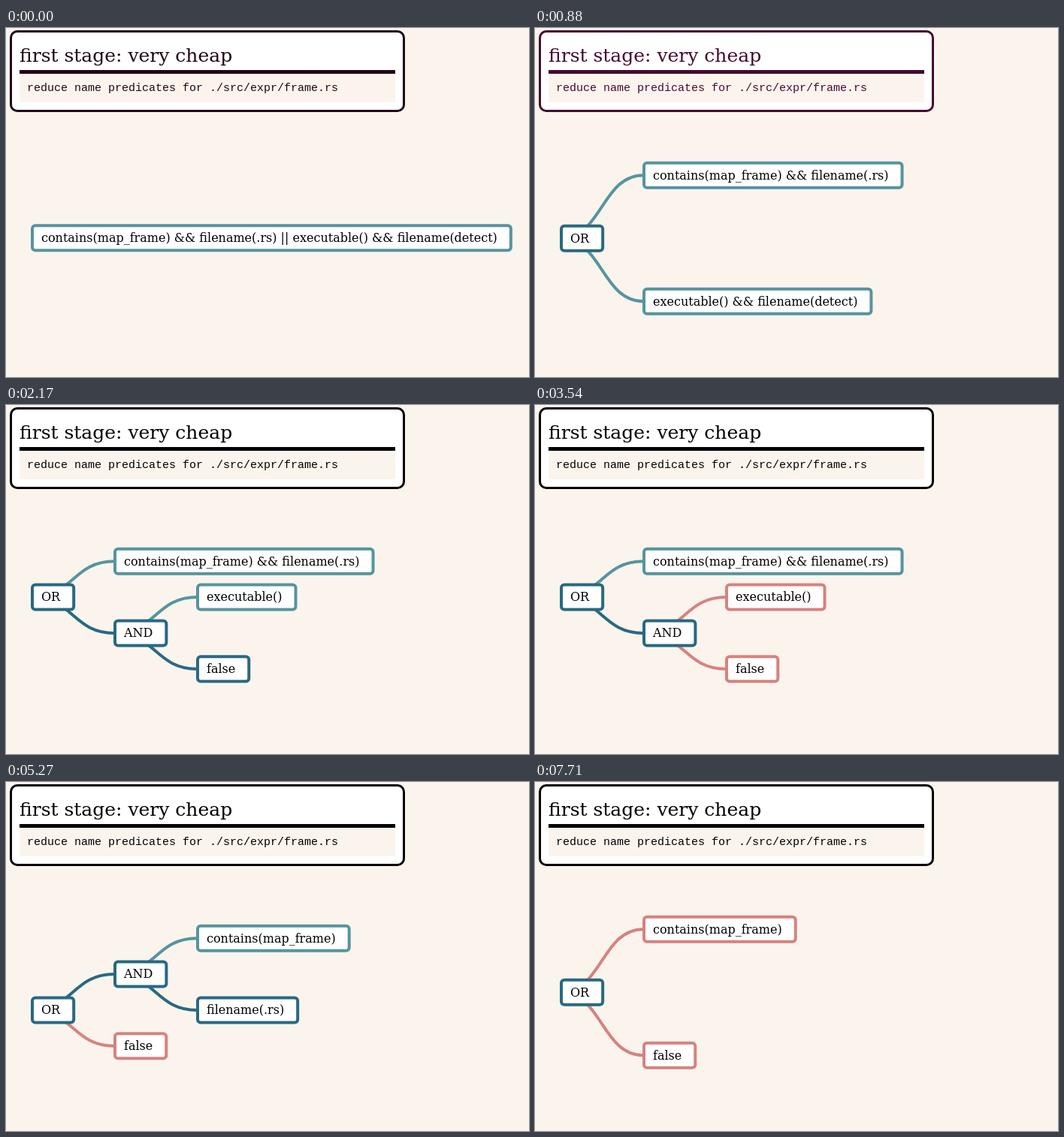
Animation of 696x465 px, one loop 8 s. Source, as an HTML page:

```html
<!DOCTYPE html>
<html lang="en">
<head>
<meta charset="utf-8">
<title>Predicate reduction</title>
<style>
  html, body { margin: 0; width: 100%; height: 100%; overflow: hidden; background: #faf4ed; }
  svg { display: block; width: 696px; height: 465px; }
  text { white-space: pre; }
  .title { font: 25px "DejaVu Serif", serif; }
  .code { font: 15px "Liberation Mono", monospace; }
  #tree { font: 16px "DejaVu Serif", serif; }
  #tree rect { fill: #fff; stroke-width: 4; }
  #tree path { fill: none; stroke-width: 4; }
</style>
</head>
<body>
<svg viewBox="0 0 696 465">
  <g id="head" fill="currentColor">
    <rect x="6.5" y="4.5" width="523" height="106" rx="8.5" fill="#fff" stroke="currentColor" stroke-width="3"/>
    <rect x="18" y="61" width="500" height="38" fill="#faf4ed"/>
    <rect x="18" y="56" width="500" height="5"/>
    <text class="title" x="18" y="45">first stage: very cheap</text>
    <text class="code" x="28" y="84">reduce name predicates for ./src/expr/frame.rs</text>
  </g>
  <g id="tree"><g id="edges"></g><g id="nodes"></g></g>
</svg>
<script>
const LOOP = 8000, MOVE = 240, INDENT = 110;
const IDLE = [86, 148, 159], ACTIVE = [40, 105, 131], DONE = [215, 130, 126];
const FLASH = [199, 21, 133], BLACK = [0, 0, 0];

const node = (text, color, ...kids) => ({ text, color, kids });
const or = (...kids) => node('OR', ACTIVE, ...kids);
const and = (...kids) => node('AND', ACTIVE, ...kids);
const map = c => node('contains(map_frame)', c);
const exec = c => node('executable()', c);
const detect = c => node('filename(detect)', c);
const rs = c => node('filename(.rs)', c);
const no = node('false', DONE), yes = node('true', DONE);
const left = node('contains(map_frame) && filename(.rs)', IDLE);
const right = node('executable() && filename(detect)', IDLE);
const whole = node(left.text + ' || ' + right.text, IDLE);

const steps = [
  [-1000, whole],
  [388, or(left, right)],
  [938, or(left, and(exec(IDLE), detect(IDLE)))],
  [1518, or(left, and(exec(IDLE), detect(ACTIVE)))],
  [2133, or(left, and(exec(IDLE), no))],
  [2728, or(left, and(exec(ACTIVE), no))],
  [3298, or(left, and(exec(DONE), no))],
  [3868, or(left, no)],
  [4493, or(and(map(IDLE), rs(IDLE)), no)],
  [5008, or(and(map(IDLE), rs(ACTIVE)), no)],
  [5643, or(and(map(IDLE), yes), no)],
  [6158, or(and(map(ACTIVE), yes), no)],
  [6808, or(and(map(DONE), yes), no)],
  [7433, or(map(DONE), no)]
].map(([start, root]) => ({ start, nodes: place(root) }));

// Flat map from path to placed node, parents before children
function place(root) {
  const out = new Map();
  const deep = root.kids.findIndex(k => k.kids.length);
  const gap = deep < 0 ? 84 : 47.8;
  const top = !root.kids.length ? 279.7 : deep < 0 ? 280.2 : deep ? 256.1 : 303.9;
  const walk = (n, path, x, y) => {
    out.set(path, { text: n.text, color: n.color, x, y });
    n.kids.forEach((k, i) => walk(k, path + i, x + INDENT, y + (i ? gap : -gap)));
  };
  walk(root, 'r', 33, top);
  return out;
}

const mix = (a, b, p) => a + (b - a) * p;
const blend = (a, b, p) => `rgb(${a.map((v, i) => Math.round(mix(v, b[i], p)))})`;
const clamp = v => Math.min(1, Math.max(0, v));
const ease = p => p < .5 ? 4 * p ** 3 : 1 - 4 * (1 - p) ** 3;

const pen = document.createElement('canvas').getContext('2d');
pen.font = '16px "DejaVu Serif", serif';
const widths = {};
const textWidth = s => widths[s] ??= pen.measureText(s).width;

const byId = id => document.getElementById(id);
const head = byId('head');
function add(parent, tag) {
  return parent.appendChild(document.createElementNS('http://www.w3.org/2000/svg', tag));
}
function set(el, attrs) {
  for (const k in attrs) el.setAttribute(k, attrs[k]);
}

const slots = Array.from({ length: 5 }, () => {
  const edge = add(byId('edges'), 'path'), group = add(byId('nodes'), 'g');
  const box = add(group, 'rect'), label = add(group, 'text');
  set(box, { height: 33, rx: 4 });
  return { edge, group, box, label };
});

const glow = [[0, .17], [310, 1], [480, 1], [560, .88], [1100, 0], [LOOP, 0]];
function glowAt(t) {
  const i = glow.findIndex(k => t < k[0]);
  const [t0, a] = glow[i - 1], [t1, b] = glow[i];
  return mix(a, b, (t - t0) / (t1 - t0));
}

function draw(t) {
  head.style.color = blend(BLACK, FLASH, glowAt(t));

  const i = steps.findLastIndex(s => s.start <= t);
  const { start, nodes } = steps[i];
  const before = steps[Math.max(0, i - 1)].nodes;
  const p = ease(clamp((t - start) / MOVE));
  const now = {};
  let used = 0;

  for (const [path, to] of nodes) {
    const parent = path.slice(0, -1);
    const from = before.get(path) || before.get(parent) || to;
    const x = mix(from.x, to.x, p), y = mix(from.y, to.y, p);
    const stroke = blend(from.color, to.color, p);
    const { edge, group, box, label } = slots[used++];
    now[path] = { x: x + 1, y };

    group.style.display = '';
    set(box, { x: x + 2, y: y - 16.5, width: textWidth(to.text) + 30, stroke });
    set(label, { x: x + 14, y: Math.round(y + 5.35) });
    if (label.textContent !== to.text) label.textContent = to.text;

    const a = now[parent], b = now[path];
    edge.style.display = a ? '' : 'none';
    if (a) {
      const mid = (a.x + b.x) / 2;
      set(edge, { d: `M${a.x} ${a.y}C${mid} ${a.y} ${mid} ${b.y} ${b.x} ${b.y}`, stroke });
    }
  }
  for (; used < slots.length; used++) {
    slots[used].edge.style.display = slots[used].group.style.display = 'none';
  }
}

let origin;
function tick(now) {
  origin ??= now;
  draw(Math.max(0, now - origin) % LOOP);
  requestAnimationFrame(tick);
}
draw(0);
requestAnimationFrame(tick);
</script>
</body>
</html>
```
